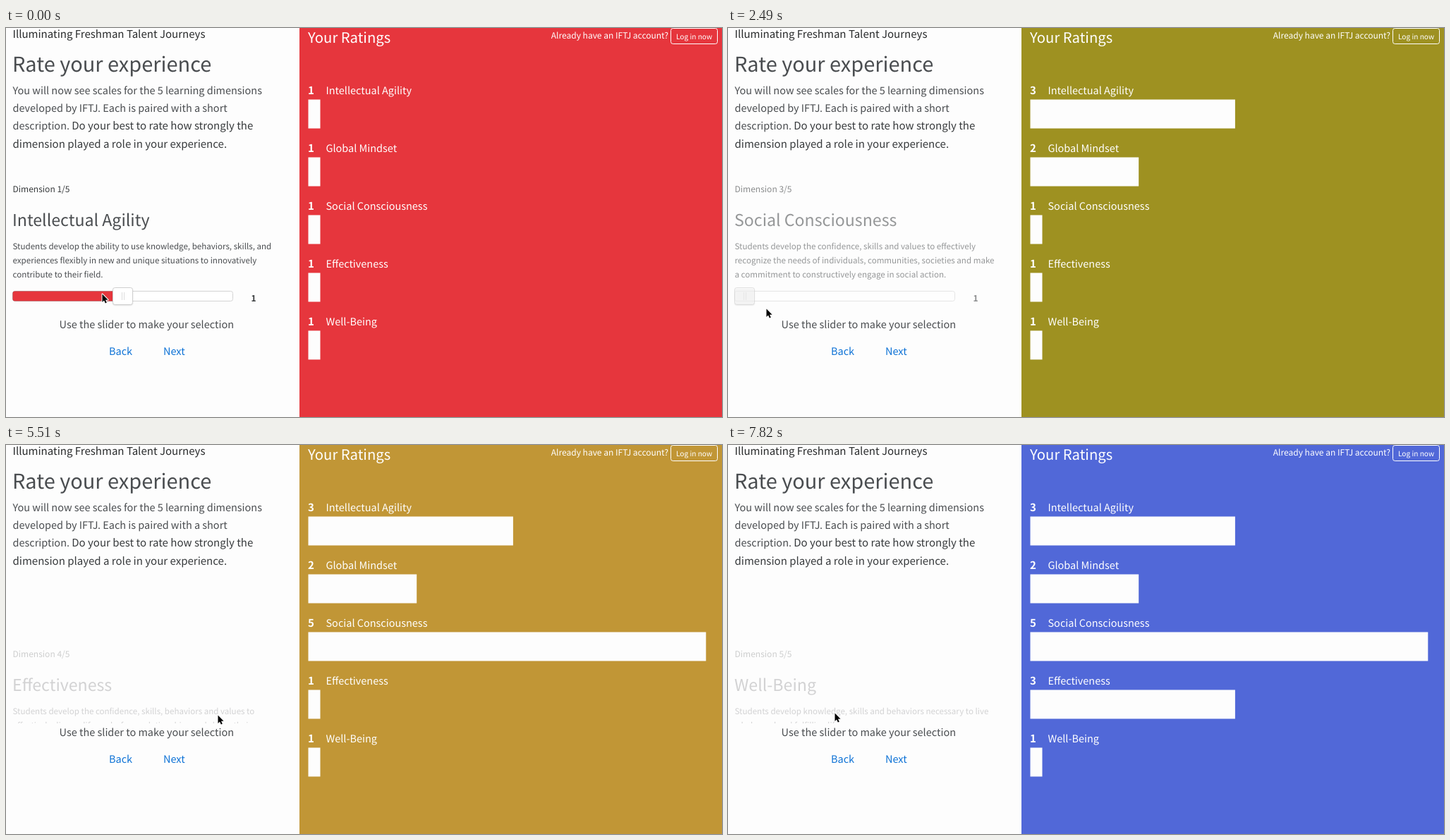
An HTML page with a canvas for the animation above (8000 ms loop, 1015 px wide and 552 px high).

```html
<!DOCTYPE html>
<html lang="en">
<head>
<meta charset="utf-8">
<title>Rate your experience</title>
<style>
  html, body { margin: 0; width: 100%; height: 100%; overflow: hidden; background: #fdfdfd; }
  canvas { display: block; width: 1015px; height: 552px; }
</style>
</head>
<body>
<canvas id="stage"></canvas>
<script>
const W = 1015, H = 552, LOOP = 8000, STEPS = 45;
const PAPER = '#fdfdfd', INK = '#373a3c', SOFT = '#4a4d50', LINK = '#0f73d6';
const FAMILY = '"Noto Sans CJK JP", "Noto Sans CJK SC", "Noto Sans CJK", sans-serif';

const canvas = document.getElementById('stage');
const ctx = canvas.getContext('2d');
const dpr = window.devicePixelRatio || 1;
canvas.width = W * dpr;
canvas.height = H * dpr;

const dims = [
  { name: 'Intellectual Agility', color: [230, 54, 61], start: -9, drag: [0, 0], rating: 3, lines: [
    'Students develop the ability to use knowledge, behaviors, skills, and',
    'experiences flexibly in new and unique situations to innovatively',
    'contribute to their field.'] },
  { name: 'Global Mindset', color: [0, 107, 94], start: 1, drag: [9, 11], rating: 2, lines: [
    'Students develop knowledge, skills and behaviors to live, work and',
    'communicate with people whose background, experience and',
    'perspectives are different from their own as well as to consider the',
    'global impact of their decisions.'] },
  { name: 'Social Consciousness', color: [243, 166, 0], start: 13, drag: [19, 29], rating: 5, lines: [
    'Students develop the confidence, skills and values to effectively',
    'recognize the needs of individuals, communities, societies and make',
    'a commitment to constructively engage in social action.'] },
  { name: 'Effectiveness', color: [42, 101, 217], start: 31, drag: [39, 40], rating: 3, lines: [
    'Students develop the confidence, skills, behaviors and values to',
    'effectively discern life goals, form relationships and shape their',
    'personal and professional identities to achieve fulfillment.'] },
  { name: 'Well-Being', color: [198, 113, 213], start: 44, drag: [99, 99], rating: 1, lines: [
    'Students develop knowledge, skills and behaviors necessary to live',
    'a balanced and fulfilling life.'] }
];

// Entrance of a pane, step by step
const entrance = [
  { drop: 68.5, alpha: 0.24, mix: 0.25, clip: 395 },
  { drop: 0, alpha: 0.58, mix: 0.65, clip: H },
  { drop: 0, alpha: 1, mix: 1, clip: H }
];

// Pointer path: step, x, y
const path = [
  [0, 136, 377], [1, 137, 378], [3, 137, 378], [4, 105, 384], [5, 55, 396],
  [6, 27, 402], [7, 26, 401], [8, 26, 401], [11, 61, 401], [12, 61, 401],
  [14, 54, 398], [16, 31, 381], [17, 27, 378], [18, 27, 378], [20, 75, 378],
  [24, 251, 378], [26, 251, 378], [28, 305, 384], [29, 326, 388],
  [30, 326, 388], [31, 300, 383], [33, 136, 355], [34, 90, 357], [36, 32, 379],
  [38, 24, 381], [39, 80, 381], [40, 151, 380], [45, 151, 380]
];

function pointer(step) {
  const i = Math.max(1, path.findIndex(p => p[0] >= step));
  const [a, b] = [path[i - 1], path[i]];
  const f = (step - a[0]) / (b[0] - a[0]);
  return { x: a[1] + (b[1] - a[1]) * f, y: a[2] + (b[2] - a[2]) * f };
}

function widthAt(weight) {
  ctx.font = `${weight} 100px ${FAMILY}`;
  return ctx.measureText('Rate your experience').width;
}

// The CJK face draws Latin 1.117 times larger; without a Light cut, Regular runs wide
const lightScale = widthAt(300) === widthAt(400) ? 0.963 : 1;

function text(str, x, y, size, { weight = 300, color = SOFT, align = 'left' } = {}) {
  const px = size / 1.117 * (weight === 300 ? lightScale : 1);
  ctx.font = `${weight} ${px.toFixed(2)}px ${FAMILY}`;
  ctx.fillStyle = color;
  ctx.textAlign = align;
  ctx.fillText(str, x, y);
  return ctx.measureText(str).width;
}

function box(x, y, w, h, r, fill, stroke) {
  ctx.beginPath();
  ctx.roundRect(x, y, w, h, r);
  if (fill) { ctx.fillStyle = fill; ctx.fill(); }
  if (stroke) { ctx.strokeStyle = stroke; ctx.lineWidth = 1; ctx.stroke(); }
}

const rgb = c => `rgb(${c.map(Math.round).join(',')})`;
const blend = (a, b, f) => a.map((v, i) => v + (b[i] - v) * f);

function drawIntro() {
  text('Illuminating Freshman Talent Journeys', 9.5, 14, 16.8, { weight: 400, color: '#292b2c' });
  text('Rate your experience', 9, 62, 33.6);
  text('You will now see scales for the 5 learning dimensions', 9.5, 94, 16.8);
  text('developed by IFTJ. Each is paired with a short', 9.5, 119.2, 16.8);
  const lead = text('description. ', 9.5, 144.4, 16.8);
  const strong = { weight: 400, color: INK };
  text('Do your best to rate how strongly the', 9.5 + lead, 144.4, 16.8, strong);
  text('dimension played a role in your experience.', 9.5, 169.6, 16.8, strong);
}

function drawSlider(level, color) {
  const cx = 23.5 + level * 71;
  box(9.5, 373.5, 312, 14, 3, '#fff', '#d4d4d4');
  if (level) box(9.5, 373.5, cx - 9.5, 14, 3, color, 'rgba(0,0,0,0.12)');
  ctx.save();
  ctx.shadowColor = 'rgba(0,0,0,0.18)';
  ctx.shadowBlur = 2 * dpr;
  ctx.shadowOffsetY = dpr;
  box(cx - 14, 368.5, 28, 24, 3, '#fff');
  ctx.restore();
  box(cx - 14, 368.5, 28, 24, 3, null, '#cfcfcf');
  ctx.fillStyle = '#dcdcdc';
  ctx.fillRect(cx - 1.5, 375, 1, 11);
  ctx.fillRect(cx + 1.5, 375, 1, 11);
}

function drawPane(index, phase, level) {
  const dim = dims[index];
  ctx.save();
  ctx.beginPath();
  ctx.rect(0, 0, 416, phase.clip);
  ctx.clip();
  ctx.globalAlpha = phase.alpha;
  ctx.translate(0, phase.drop);
  text(`Dimension ${index + 1}/5`, 9.5, 232.5, 13.44, { weight: 400, color: INK });
  text(dim.name, 9, 280.5, 26.88);
  dim.lines.forEach((line, i) => text(line, 9.5, 313.7 + i * 20.16, 13.44));
  ctx.translate(0, (dim.lines.length - 3) * 20.16);
  drawSlider(level, rgb(dim.color));
  text('1', 351, 388, 13.44, { weight: 700, color: INK, align: 'center' });
  ctx.restore();
}

function drawControls(shift) {
  text('Use the slider to make your selection', 199.3, 425.5 + shift, 16.8, { align: 'center' });
  text('Back', 146, 464 + shift, 16.8, { color: LINK });
  text('Next', 223, 464 + shift, 16.8, { color: LINK });
}

function drawRatings(current, color) {
  const white = { color: '#fff' };
  ctx.fillStyle = color;
  ctx.fillRect(416, 0, W - 416, H);
  text('Your Ratings', 428, 20.5, 23.52, white);
  text('Already have an IFTJ account?', 939, 14.5, 13.44, { weight: 400, color: '#fff', align: 'right' });
  box(942.5, 0.5, 66, 22, 3, null, '#fff');
  text('Log in now', 975.5, 15.5, 11.76, { color: '#fff', align: 'center' });
  dims.forEach((dim, i) => {
    const y = 82 * i, rating = i < current ? dim.rating : 1;
    text(rating, 428, 93.5 + y, 16.8, { weight: 700, color: '#fff' });
    text(dim.name, 453.5, 93.5 + y, 16.8, white);
    ctx.fillStyle = PAPER;
    ctx.fillRect(428.5, 101.5 + y, 17 + 136.7 * (rating - 1), 41);
  });
}

function drawPointer({ x, y }, beam) {
  ctx.save();
  ctx.translate(x, y);
  ctx.lineJoin = 'round';
  ctx.beginPath();
  if (beam) {
    ctx.moveTo(-2.5, -6); ctx.quadraticCurveTo(0.5, -6, 0.5, -4);
    ctx.quadraticCurveTo(0.5, -6, 3.5, -6);
    ctx.moveTo(0.5, -4); ctx.lineTo(0.5, 5);
    ctx.moveTo(-2.5, 6.5); ctx.quadraticCurveTo(0.5, 6.5, 0.5, 4.5);
    ctx.quadraticCurveTo(0.5, 6.5, 3.5, 6.5);
    ctx.moveTo(-1, 2.5); ctx.lineTo(2, 2.5);
    ctx.strokeStyle = '#222';
    ctx.lineWidth = 1;
    ctx.stroke();
  } else {
    [[0.5, 0.5], [0.5, 12], [3, 9.6], [4.8, 13.6], [6.8, 12.7], [5, 8.8], [8.6, 8.8]]
      .forEach(p => ctx.lineTo(...p));
    ctx.closePath();
    ctx.strokeStyle = '#fff';
    ctx.lineWidth = 2;
    ctx.stroke();
    ctx.fillStyle = '#000';
    ctx.fill();
  }
  ctx.restore();
}

function sliderLevel(dim, step) {
  const [from, to] = dim.drag;
  if (step < from) return 0;
  const { x } = pointer(Math.min(step, to));
  return Math.max(0, Math.min(4, Math.round((x - 24) / 71)));
}

function draw(step) {
  const current = dims.findLastIndex(d => d.start <= step);
  const dim = dims[current];
  const phase = entrance[Math.min(2, step - dim.start)];
  const before = dims[Math.max(0, current - 1)];

  ctx.setTransform(dpr, 0, 0, dpr, 0, 0);
  ctx.textRendering = 'geometricPrecision';
  ctx.fillStyle = PAPER;
  ctx.fillRect(0, 0, W, H);
  drawIntro();
  drawPane(current, phase, sliderLevel(dim, step));
  drawControls(phase.drop ? -12.6 : (dim.lines.length - 3) * 20.16);
  drawRatings(current, rgb(blend(before.color, dim.color, phase.mix)));
  drawPointer(pointer(step), step === 33 || step === 34);
}

// The picture advances in even steps and holds between them
function tick(now) {
  const t = now % LOOP;
  draw(Math.min(STEPS - 1, Math.floor((t + 10.1) / LOOP * STEPS)));
  requestAnimationFrame(tick);
}
requestAnimationFrame(tick);
</script>
</body>
</html>
```
